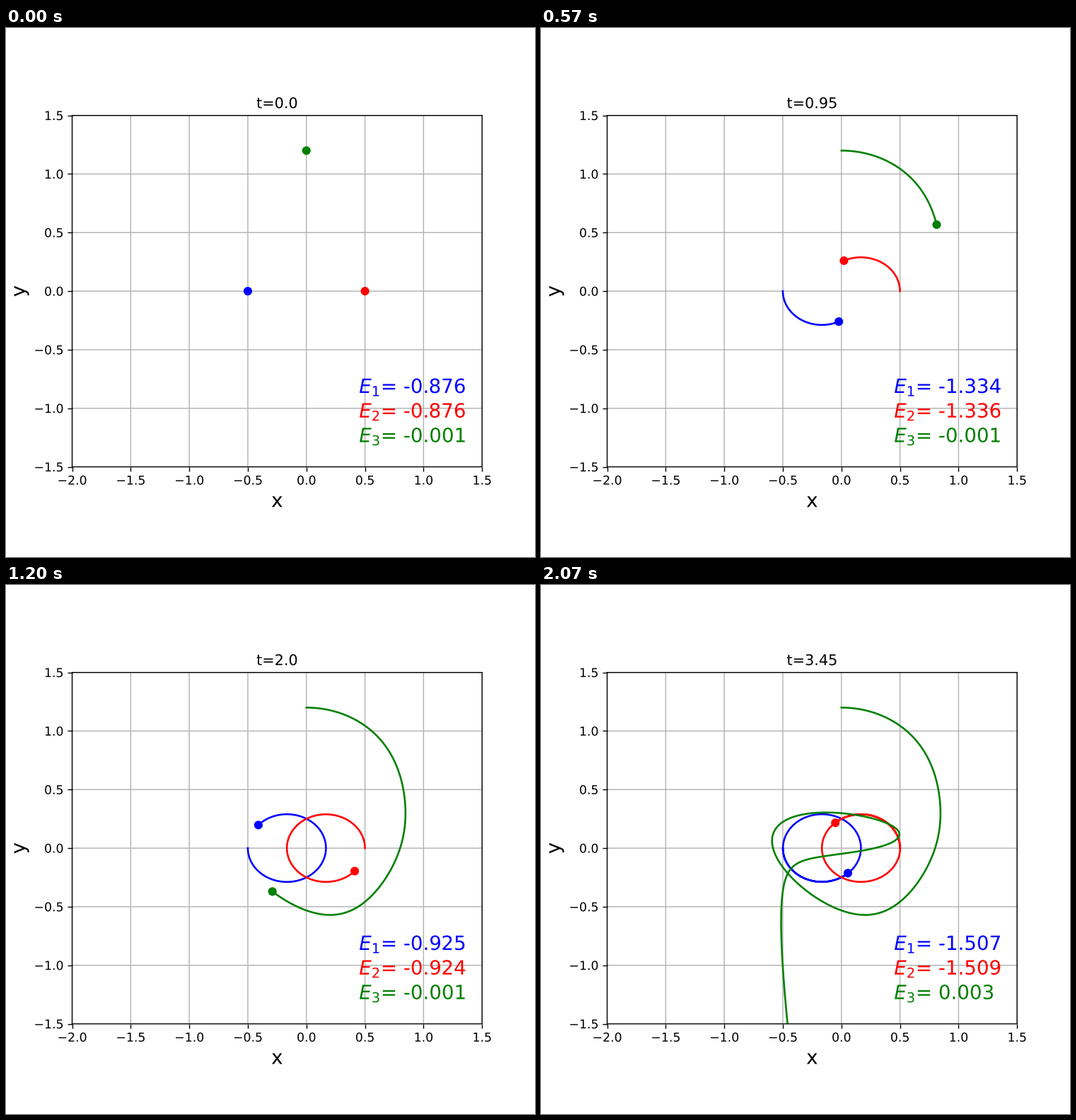
Recreate the animation shown at these times as a matplotlib script. Size 748 px wide and 748 px high, loop 2.1 s.

```python
import numpy as np
import matplotlib.pyplot as plt
from matplotlib.animation import FuncAnimation
from matplotlib.patheffects import Normal

SIZE, INCHES = 748, 6
FRAMES, INTERVAL = 70, 30
DT, STEPS = 0.001, 50  # solver step, solver steps per frame

COLORS = ["blue", "red", "green"]
MASS = np.array([1, 1, 0.001])
START = np.array([-0.5, 0.5, 1.2j])   # positions as x + iy
SPEED = np.array([-0.5j, 0.5j, 1])

# Smooth subpixel placement of lines, markers and glyphs
plt.rcParams.update({
    "path.snap": False,
    "path.effects": [Normal()],
    "text.hinting": "no_hinting",
})


def gaps(z):
    """Pairwise offsets and distances, with self-distance infinite."""
    d = z[None, :] - z[:, None]
    r = np.abs(d)
    np.fill_diagonal(r, np.inf)
    return d, r


def simulate():
    """Semi-implicit Euler integration of the three bodies."""
    z, v = START.astype(complex), SPEED.astype(complex)
    path = [z.copy()]
    energy = []
    for n in range((FRAMES - 1) * STEPS + 1):
        d, r = gaps(z)
        if n % STEPS == 0:
            energy.append(MASS * (0.5 * np.abs(v) ** 2 - (MASS / r).sum(axis=1)))
        v = v + DT * (MASS * d / r**3).sum(axis=1)
        z = z + DT * v
        path.append(z)
    return np.array(path), np.array(energy)


path, energy = simulate()

fig = plt.figure(figsize=(INCHES, INCHES), dpi=SIZE / INCHES)
ax = fig.add_axes([0.125, 0.1704, 0.775, 0.775 * 3 / 3.5])
ax.set_xlim(-2, 1.5)
ax.set_ylim(-1.5, 1.5)
ax.set_xticks(np.arange(-2, 1.6, 0.5))
ax.set_yticks(np.arange(-1.5, 1.6, 0.5))
ax.set_xlabel("x", fontsize=16)
ax.set_ylabel("y", fontsize=16)
ax.grid(True)
title = ax.set_title("t=0.0")

trails = [ax.plot([], [], color=c)[0] for c in COLORS]
dots = [ax.plot([], [], "o", color=c)[0] for c in COLORS]
labels = [
    ax.text(0.7, 0.21 - 0.07 * i, "", color=c, fontsize=16, transform=ax.transAxes)
    for i, c in enumerate(COLORS)
]


def draw(k):
    n = k * STEPS
    title.set_text(f"t={round(n * DT, 2)}")
    for i in range(3):
        z = path[: n + 1, i]
        trails[i].set_data(z.real, z.imag)
        dots[i].set_data(z.real[-1:], z.imag[-1:])
        labels[i].set_text(f"$E_{i + 1}$= {round(float(energy[k, i]), 3)}")
    return [title, *trails, *dots, *labels]


anim = FuncAnimation(fig, draw, frames=FRAMES, interval=INTERVAL, repeat=True)
plt.show()
```
